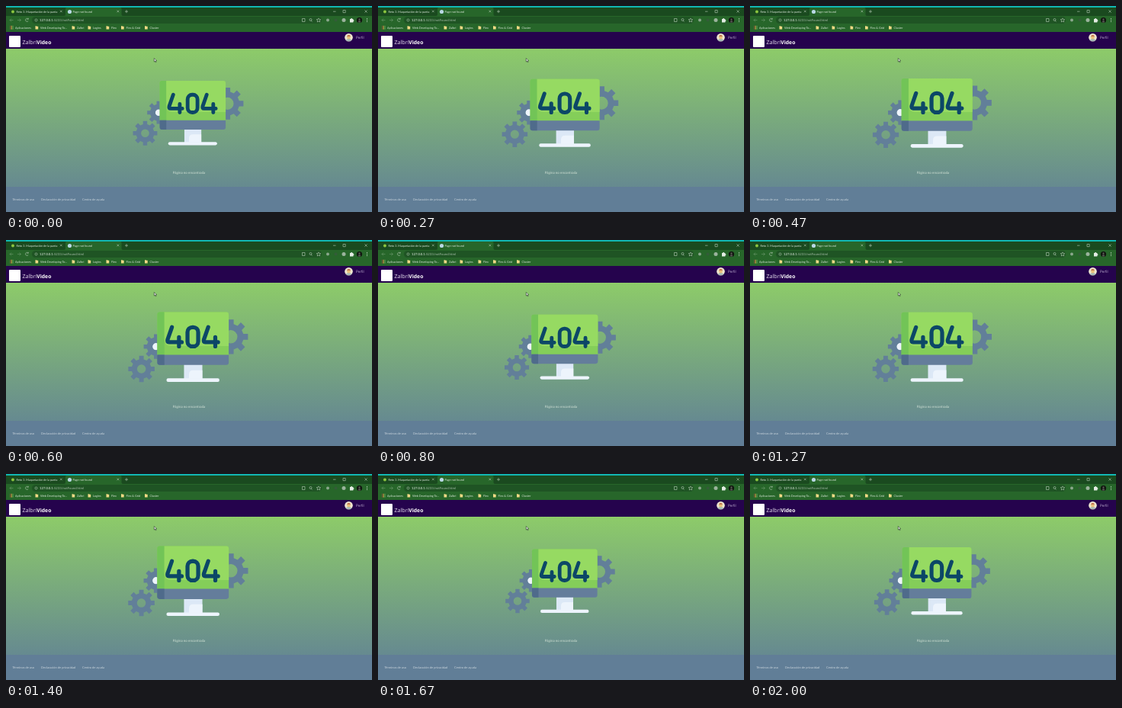
An HTML page for the animation above (2.07 s loop, 480 by 270 pixels).

```html
<!DOCTYPE html>
<html lang="es">
<head>
<meta charset="utf-8">
<title>Page not found</title>
<style>
  html, body { margin: 0; width: 100%; height: 100%; overflow: hidden; background: #617e97; }
  svg { display: block; width: 480px; height: 270px; }
  text { font-family: Lato, "Open Sans", sans-serif; text-rendering: geometricPrecision; white-space: pre; }
  .ui { font-size: 3.8px; fill: #dce8dc; }
  .foot { font-size: 4px; fill: #c9d4dc; }
  .line { fill: none; stroke: #b9cdb9; stroke-width: .6; }
  .dim { stroke: #6f9a70; }
</style>
</head>
<body>
<svg viewBox="0 0 480 270">
  <defs>
    <linearGradient id="sky" x1="0" y1="0" x2="0" y2="1">
      <stop offset="0" stop-color="#8dcb69"/>
      <stop offset="1" stop-color="#668a90"/>
    </linearGradient>
  </defs>

  <!-- browser -->
  <rect width="480" height="35" fill="#27662a"/>
  <rect width="480" height="13" fill="#1a4a1f"/>
  <rect width="480" height="2" fill="#12b5b0"/>
  <path d="M76 13q2 0 2-2V3.500q0-1.500 1.500-1.500H150q1.500 0 1.500 1.500V11q0 2 2 2z" fill="#27662a"/>
  <circle cx="9" cy="7.500" r="2" fill="#8bc63f"/>
  <text class="ui" x="13.500" y="8.900">Reto 3. Maquetación de la panta</text>
  <circle cx="83.500" cy="7.500" r="2.600" fill="#b9d8e4"/>
  <text class="ui" x="87.500" y="8.900">Page not found</text>
  <path class="line" d="M71 6l2.600 2.600m0-2.600l-2.600 2.600M145.500 6l2.600 2.600m0-2.600l-2.600 2.600M156 7.500h4m-2-2v4
    M429 7.500h3.500M442 5.800h3.200v3.200h-3.200zM470.500 5.800l3.200 3.200m0-3.200l-3.200 3.200" transform="translate(0 -.3)"/>
  <rect x="34" y="14" width="380" height="9" rx="4.500" fill="#1f5424"/>
  <path class="line dim" d="M9.500 18.500H5m2-2l-2 2 2 2M15 18.500h4.500m-2-2l2 2-2 2"/>
  <path class="line" d="M29 17a2 2 0 1 0 .2 2.600M29.300 15.800v1.500h-1.500"/>
  <circle class="line" cx="39.500" cy="18.500" r="1.500"/>
  <text x="44" y="20" font-size="4.250" fill="#f1f6f1">127.0.0.1<tspan fill="#a6bca8">:5233/notFound.html</tspan></text>
  <path class="line" d="M388.500 16.500h3.500v4h-3.500zM401.500 20.500l-1.500-1.500"/>
  <circle class="line" cx="399.500" cy="18" r="1.500"/>
  <path d="M410 15.900l.8 1.700 2 .1-1.500 1.300.5 2-1.800-1.100-1.800 1.100.5-2-1.500-1.300 2-.1z" class="line"/>
  <circle cx="422" cy="18.500" r="2" fill="#8aa78c"/>
  <circle cx="432.500" cy="18.500" r="2" fill="#335c38"/>
  <circle cx="443" cy="18.500" r="2.500" fill="#9bb39d"/>
  <path d="M451 17h1.200a1 1 0 0 1 2 0h1.200v1.200a1 1 0 0 1 0 2v1.200H451z" fill="#e4ece4"/>
  <circle cx="463.500" cy="18.500" r="3.600" fill="#10160f"/>
  <path d="M462 21.800v-2.300q1.500-1.500 3 0v2.300z" fill="#4c4d49"/>
  <circle cx="463.500" cy="17.500" r="1.100" fill="#6c6a64"/>
  <g fill="#dce8dc"><circle cx="473.500" cy="16.500" r=".55"/><circle cx="473.500" cy="18.500" r=".55"/><circle cx="473.500" cy="20.500" r=".55"/></g>
  <g id="marks"></g>

  <!-- page -->
  <rect y="34" width="480" height="22" fill="#25034d"/>
  <rect x="4" y="39" width="15" height="15" rx="1" fill="#fff"/>
  <text x="21.500" y="49.500" font-size="7.100" fill="#e9e3f1" style="font-family:'Open Sans',sans-serif">Zalbri<tspan font-weight="700" font-size="6.800" fill="#fff">Video</tspan></text>
  <circle cx="449.500" cy="41.300" r="5.300" fill="#eee6cf"/>
  <path d="M445.500 44.500q4-3 8 0-4 3-8 0z" fill="#9fb6b5"/>
  <circle cx="449.500" cy="41.300" r="2.300" fill="#e9c07a"/>
  <path d="M446.800 40q2.700-4.500 5.400 0z" fill="#c2774f"/>
  <text x="459" y="43" font-size="4.700" fill="#b2a2c7">Perfil</text>
  <rect y="56" width="480" height="181" fill="url(#sky)"/>
  <rect y="237" width="480" height="33" fill="#617e97"/>
  <text x="240" y="220.200" font-size="4.500" text-anchor="middle" fill="#d3e2d6">Página no encontrada</text>
  <text class="foot" x="8.500" y="255.400">Términos de uso</text>
  <text class="foot" x="46" y="255.400">Declaración de privacidad</text>
  <text class="foot" x="100" y="255.400">Centro de ayuda</text>

  <g id="art">
    <circle cx="200.500" cy="139.700" r="4.600" fill="#edf4fc"/>
    <g id="gears" fill="#627f99" fill-rule="evenodd"></g>
    <rect x="234" y="160" width="22" height="19" fill="#dce8f6"/>
    <path d="M256 178.500v-10.500h-11q-5 0-5 5v5.500z" fill="#edf4fc"/>
    <rect x="213" y="177.800" width="63.500" height="4.200" rx="2.100" fill="#edf4fc"/>
    <path d="M202 150V101.500q0-3 3-3H284.600q3 0 3 3V150z" fill="#84ce59"/>
    <path d="M202 150V101.500q0-3 3-3h5.500V150z" fill="#72c457"/>
    <path d="M210.500 98.500H284.600q3 0 3 3V139H218.500q-8 0-8-8z" fill="#96da62"/>
    <path d="M202 149.600h85.600v9.200q0 3-3 3H205q-3 0-3-3z" fill="#647d9b"/>
    <path d="M202 149.600h8.500v12.200h-5.500q-3 0-3-3z" fill="#4f6b8b"/>
    <g fill="none" stroke="#0c4767" stroke-width="4.800" stroke-linecap="round" stroke-linejoin="round">
      <path id="four" d="M219.500 116.500L214.300 131.500Q213.500 134.500 216 134.500H231.300M228 128.500V139.500"/>
      <use href="#four" x="43.500"/>
      <rect x="238.200" y="116.500" width="12.800" height="23" rx="6"/>
    </g>
  </g>

  <path d="M194.300 68.500v4.600l1.100-1 .8 1.700.8-.4-.8-1.600h1.400z" fill="#fff" stroke="#1d2e1f" stroke-width=".6"/>
</svg>
<script>
const $ = id => document.getElementById(id);

const folder = x => `<path d="M${x} 26.200h1.500l.5.600h1.700v3.700h-3.700z" fill="#f3da85"/>`;
const appColors = ["#e6584b", "#f0c04a", "#69b96c"];
let marks = "";
for (let i = 0; i < 9; i++)
  marks += `<circle cx="${6 + i % 3 * 1.6}" cy="${26.7 + Math.floor(i / 3) * 1.6}" r=".6" fill="${appColors[i % 3]}"/>`;
marks += `<text class="ui" x="12" y="29.700">Aplicaciones</text>`;
[[38.5, "Web Developing To..."], [86.5, "Zalbri"], [107.5, "Logins"], [131.5, "Flex"],
 [151, "Flex &amp; Grid"], [182, "Cluster"]].forEach(([x, name]) => {
  marks += folder(x) + `<text class="ui" x="${x + 6.5}" y="29.700">${name}</text>`;
});
$("marks").innerHTML = marks;

function gear(cx, cy, outer, hole) {
  const inner = outer * .74, pts = [];
  for (let i = 0; i < 8; i++)
    for (const [turn, r] of [[-.23, inner], [-.17, outer], [.17, outer], [.23, inner]]) {
      const a = i * Math.PI / 4 + turn;
      pts.push((cx + r * Math.cos(a)).toFixed(2) + " " + (cy + r * Math.sin(a)).toFixed(2));
    }
  return `<path d="M${pts.join("L")}ZM${cx - hole} ${cy}a${hole} ${hole} 0 1 0 ${2 * hole} 0a${hole} ${hole} 0 1 0 ${-2 * hole} 0z"/>`;
}
$("gears").innerHTML = gear(183, 166.5, 16, 5.3) + gear(200.5, 139.7, 15, 4.2) + gear(290, 128, 21, 8);

// CSS "ease" curve
function ease(x) {
  let lo = 0, hi = 1;
  for (let i = 0; i < 20; i++) {
    const u = (lo + hi) / 2;
    if (.75 * u * (1 - u) + u ** 3 < x) lo = u; else hi = u;
  }
  const v = 1 - lo;
  return .3 * v * v * lo + 3 * v * lo * lo + lo ** 3;
}

const LOOP = 2070, PULSE = 1000, RESTART = 660;
const start = performance.now();
function draw() {
  const t = (performance.now() - start) % LOOP;
  const phase = t < RESTART ? t + 100 : (t - RESTART) % PULSE;
  const scale = 1 + .1 * ease(phase / PULSE);
  $("art").setAttribute("transform", `translate(240 140) scale(${scale}) translate(-240 -140)`);
  requestAnimationFrame(draw);
}
draw();
</script>
</body>
</html>
```
